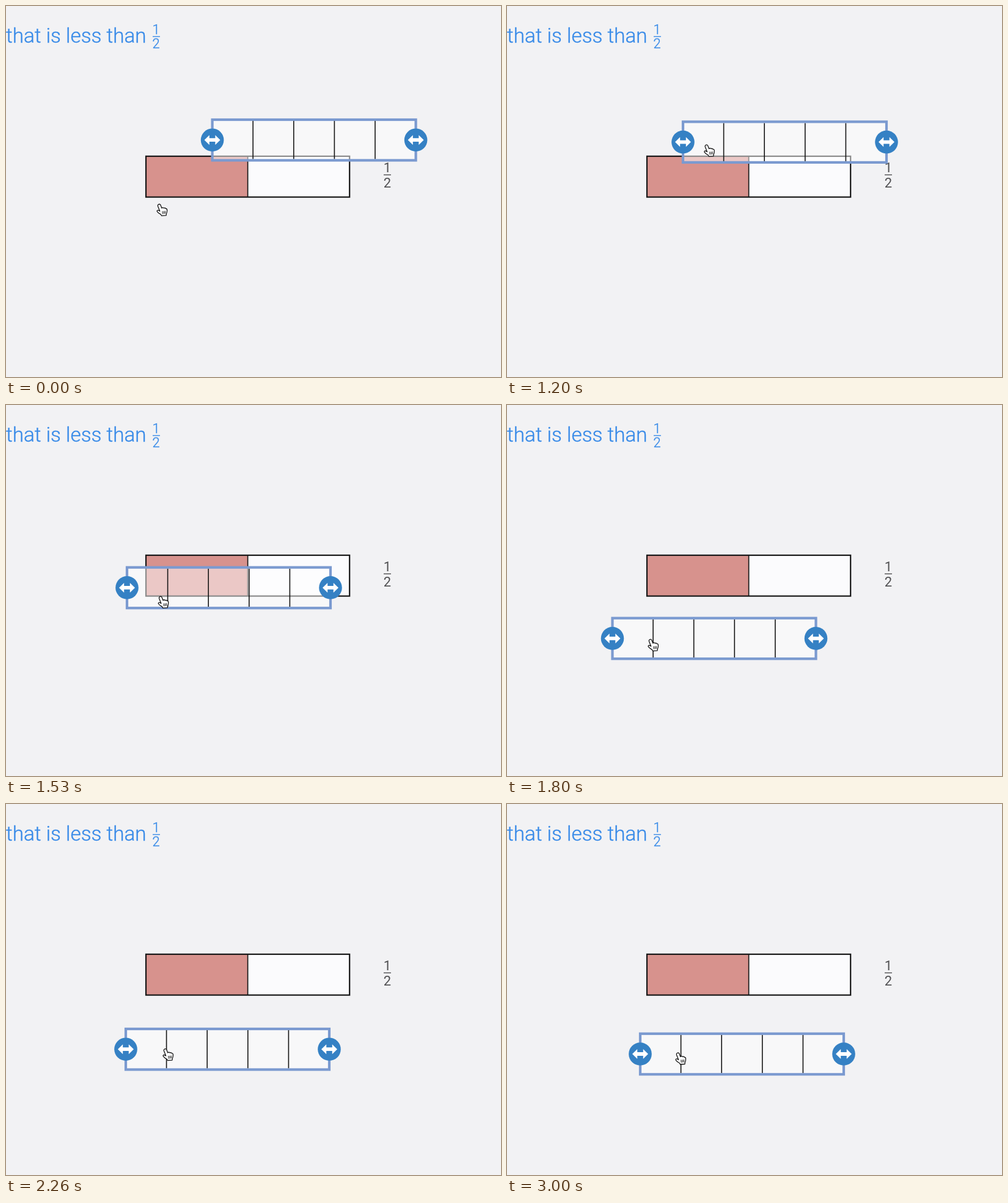
Recreate the animation shown at these times as an HTML page. Size 810x607 px, loop 4060 ms.

```html
<!DOCTYPE html>
<html lang="en">
<head>
<meta charset="utf-8">
<title>Fraction bars</title>
<style>
html, body { margin: 0; width: 100%; height: 100%; overflow: hidden; background: #f2f2f4; }
svg { display: block; width: 100vw; height: 100vh; }
text { font-family: Roboto, sans-serif; }
.title { fill: #398be8; stroke: #398be8; stroke-width: .4; font-weight: 300; }
.digit { font-size: 22px; text-anchor: middle; }
.label { fill: #505052; }
.rule { stroke: #505052; stroke-width: 1.4; }
.title .rule { stroke: #398be8; }
.ink { stroke: #161616; fill: none; }
</style>
</head>
<body>
<svg viewBox="0 0 810 607">
  <defs>
    <g id="handle">
      <circle r="18.8" fill="#3581c4"/>
      <path d="M-13 0L-4.8-8V-2.9H4.8V-8L13 0L4.8 8V2.9H-4.8V8Z" fill="#fff"/>
    </g>
  </defs>

  <g class="title">
    <text y="59.5" font-size="33.25">that is less than</text>
    <text class="digit" x="245.7" y="45.8">1</text>
    <text class="digit" x="245.7" y="69">2</text>
    <path class="rule" d="M240 50H252"/>
  </g>

  <g class="label">
    <text class="digit" x="624" y="271.5">1</text>
    <text class="digit" x="624" y="296.6">2</text>
    <path class="rule" d="M618 276.3H630"/>
  </g>

  <rect x="229" y="245.8" width="333.2" height="66.8" fill="#fbfbfd"/>
  <rect x="229" y="245.8" width="166.6" height="66.8" fill="#d7928d"/>
  <path class="ink" d="M395.6 246V312.6" stroke-width="1.7"/>
  <rect class="ink" x="229" y="245.8" width="333.2" height="66.8" stroke-width="2.2"/>

  <g id="bar">
    <rect width="333" height="66.5" fill="#fff" fill-opacity=".5"/>
    <path class="ink" d="M66.6 2v62.5m66.6 0v-62.5m66.6 0v62.5m66.6 0v-62.5" stroke-width="1.6"/>
    <rect width="333" height="66.5" fill="none" stroke="#7b9ad0" stroke-width="4.2"/>
    <use href="#handle" y="33.2"/>
    <use href="#handle" x="333" y="33.2"/>
  </g>

  <g id="hand" stroke="#111" stroke-width="1.3" stroke-linejoin="round" stroke-linecap="round">
    <path fill="#fff" d="M2.6 1.2C4.4-.2 6 .8 6.6 2.6L8.3 7C9.6 5.7 11.2 5.9 11.8 7.1C13 6.2 14.2 6.7 14.7 7.9C16.2 7.4 16.9 8.6 17 10.2Q17.2 13 15.7 16.6L15.5 19L8 19.5L6.9 17.5C4.8 16.4 2 14.4.8 12.6C0 11 1.6 9.9 3.2 10.8L5.2 12L2 4Q1.4 2 2.6 1.2Z"/>
    <path fill="none" stroke-width="1" d="M9.3 12.4l.5 3.9M11.6 12.2l.4 3.8M13.8 12l.2 3.6"/>
  </g>
</svg>
<script>
const LOOP = 4060, FPS = 15;
const LEAD = 0.75; // the bar trails the hand by this many ticks

// Where the bar is dragged: tick, x, y
const drag = [
  [13, 337.6, 186], [18, 288, 189.4], [19, 258, 199], [23, 198, 265.7],
  [27, 172.5, 348.7], [34, 196, 368], [40, 218, 375.8]
];

function ease(k, from, to) {
  const u = Math.min(1, Math.max(0, (k - from) / (to - from)));
  return u * u * (3 - 2 * u);
}

// Harmonic mean of the neighbouring slopes, flat at turns and ends
function slope(i, c) {
  const [p, q, r] = [drag[i - 1], drag[i], drag[i + 1]];
  if (!p || !r) return 0;
  const s = (q[c] - p[c]) / (q[0] - p[0]), t = (r[c] - q[c]) / (r[0] - q[0]);
  return s * t > 0 ? 2 * s * t / (s + t) : 0;
}

function barAt(tick) {
  const k = Math.min(drag.at(-1)[0], Math.max(drag[0][0], tick));
  const i = Math.max(1, drag.findIndex(p => p[0] >= k));
  const a = drag[i - 1], b = drag[i], span = b[0] - a[0], u = (k - a[0]) / span;
  return [1, 2].map(c =>
    a[c] + (b[c] - a[c]) * ease(u, 0, 1)
    + span * u * (1 - u) * (slope(i - 1, c) * (1 - u) - slope(i, c) * u));
}

function handAt(tick) {
  const [x, y] = barAt(tick + LEAD), away = 1 - ease(tick, 4, 10);
  return [x + 57.5 - 148.5 * away, y + 30.7 + 107 * away];
}

const bar = document.getElementById("bar"), hand = document.getElementById("hand");
const place = (el, pos) => el.setAttribute("transform", `translate(${pos})`);

function draw() {
  const tick = Math.floor((performance.now() % LOOP + 7) * FPS / 1000);
  place(bar, barAt(tick));
  place(hand, handAt(tick));
  requestAnimationFrame(draw);
}
draw();
</script>
</body>
</html>
```
